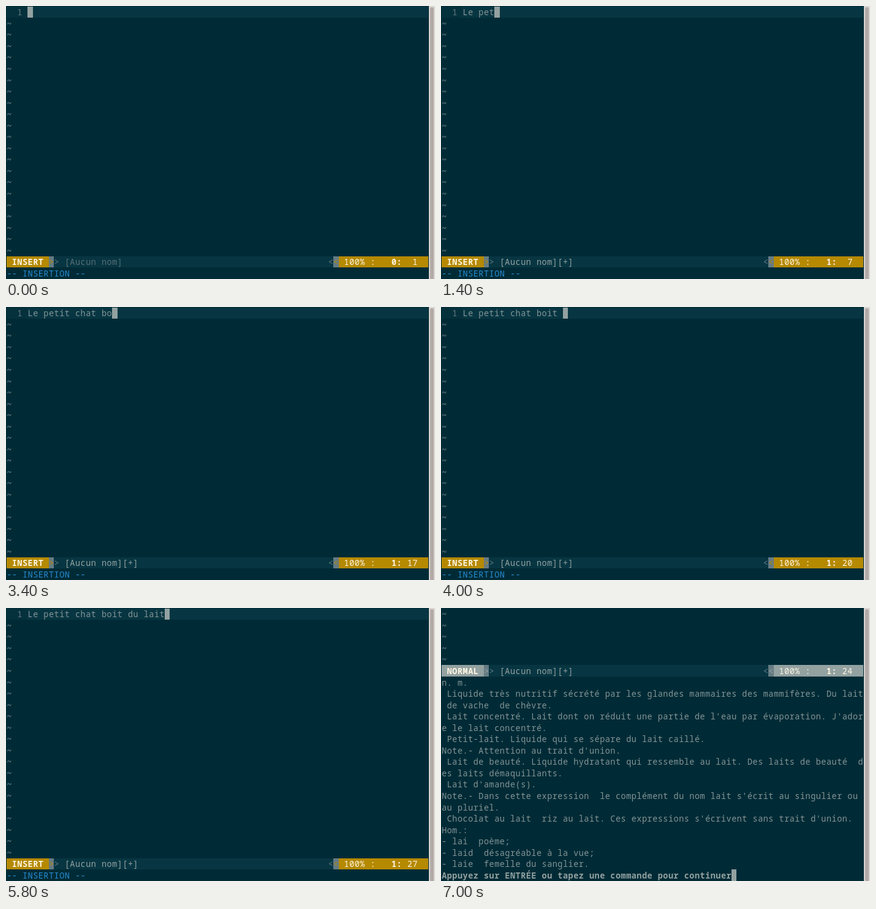
An HTML page with a canvas for the animation above (8000 ms loop, 700 by 446 pixels).

```html
<!DOCTYPE html>
<html lang="fr">
<head>
<meta charset="utf-8">
<title>Terminal</title>
<style>
  html, body { margin: 0; width: 100%; height: 100%; overflow: hidden; background: #002b36; }
  canvas { display: block; }
</style>
</head>
<body>
<canvas id="stage" width="700" height="446"></canvas>
<script>
const ctx = document.getElementById('stage').getContext('2d');
const LOOP = 8000, STEP = 200;
const CW = 8.6, RH = 18.55, X0 = 0.9, Y0 = 0.6, COLS = 80;
const FACE = '"Noto Sans Mono", "DejaVu Sans Mono", monospace';
const C = {
  bg: '#002b36', line: '#073642', gutter: '#04313c', dim: '#586e75', mid: '#657b83',
  text: '#839496', light: '#93a1a1', white: '#fdf6e3', gold: '#b58900', blue: '#268bd2'
};
const SENTENCE = 'Le petit chat boit du lait.';
const ENTRY = [
  'n. m.',
  ' Liquide très nutritif sécrété par les glandes mammaires des mammifères. Du lait',
  ' de vache  de chèvre.',
  " Lait concentré. Lait dont on réduit une partie de l'eau par évaporation. J'ador",
  'e le lait concentré.',
  ' Petit-lait. Liquide qui se sépare du lait caillé.',
  "Note.- Attention au trait d'union.",
  ' Lait de beauté. Liquide hydratant qui ressemble au lait. Des laits de beauté  d',
  'es laits démaquillants.',
  " Lait d'amande(s).",
  "Note.- Dans cette expression  le complément du nom lait s'écrit au singulier ou",
  'au pluriel.',
  " Chocolat au lait  riz au lait. Ces expressions s'écrivent sans trait d'union.",
  'Hom.:',
  '- lai  poème;',
  '- laid  désagréable à la vue;',
  '- laie  femelle du sanglier.'
];
const PROMPT = 'Appuyez sur ENTRÉE ou tapez une commande pour continuer';

const px = col => X0 + col * CW;
const py = row => Y0 + row * RH;

function cells(col, row, count, color) {
  const x = Math.round(px(col)), y = Math.round(py(row));
  ctx.fillStyle = color;
  ctx.fillRect(x, y, Math.round(px(col + count)) - x, Math.round(py(row + 1)) - y);
}

// Every character is centred in its terminal cell.
function write(str, col, row, color, bold) {
  ctx.font = (bold ? 'bold ' : '') + '13.5px ' + FACE;
  ctx.fillStyle = color;
  ctx.textAlign = 'center';
  [...str].forEach((ch, i) => {
    if (ch !== ' ') ctx.fillText(ch, px(col + i + 0.5), py(row) + 14.6);
  });
}

function tildes(from, to) {
  for (let r = from; r <= to; r++) write('~', 0, r, C.mid, true);
}

function scrollbar() {
  ctx.fillStyle = '#dad6d2';
  ctx.fillRect(690, 0, 10, 446);
  ctx.fillStyle = '#b2aaa6';
  ctx.beginPath();
  ctx.roundRect(692, 2, 6, 460, 3);
  ctx.fill();
}

function statusBar(row, s) {
  const main = s.insert ? C.gold : C.light;
  cells(0, row, COLS, C.line);
  cells(0, row, 8, main);
  cells(8, row, 1, C.mid);
  cells(62, row, 1, C.mid);
  cells(63, row, 17, main);
  write(s.insert ? 'INSERT' : 'NORMAL', 1, row, C.white, true);
  write('>', 8, row, main);
  write('>', 9, row, C.mid);
  write(s.typed ? '[Aucun nom][+]' : '[Aucun nom]', 11, row, s.typed ? C.light : C.dim);
  write('<', 61, row, C.mid);
  write('<', 62, row, main);
  write('100% :', 64, row, C.white);
  write(s.typed ? '1:' : '0:', 73, row, C.white, true);
  write(String(s.col).padStart(3), 75, row, C.white);
}

function editor(s) {
  cells(0, 0, 4, C.gutter);
  cells(4, 0, 76, C.line);
  write('1', s.insert ? 2 : 0, 0, C.mid);
  write(SENTENCE.slice(0, s.typed), 4, 0, C.text);
  if (!s.command) {
    cells(3 + s.col, 0, 1, C.light);
    if (!s.insert) write(SENTENCE[s.col - 1], 3 + s.col, 0, C.bg);
  }
  tildes(1, 21);
  statusBar(22, s);
  if (s.insert) write('-- INSERTION --', 0, 23, C.blue);
  else if (s.command) write(':', 0, 23, C.text);
}

function definition(s) {
  tildes(0, 4);
  statusBar(5, s);
  ENTRY.forEach((str, i) => write(str, 0, 6 + i, C.text));
  write(PROMPT, 0, 23, C.light, true);
  cells(PROMPT.length, 23, 1, C.light);
}

// One key per step, a pause before the full stop, then back to the last word.
function stateAt(t) {
  const n = Math.floor(t / STEP);
  const insert = n < 31;
  const typed = n >= 30 ? 27 : Math.min(26, Math.max(0, n - 1));
  const col = insert ? typed + 1 : n === 31 ? 27 : 24;
  return { insert, typed, col, command: n >= 34, result: n >= 35 };
}

function draw(t) {
  const s = stateAt(t);
  ctx.fillStyle = C.bg;
  ctx.fillRect(0, 0, 700, 446);
  if (s.result) definition(s);
  else editor(s);
  scrollbar();
}

const start = performance.now();
function tick() {
  draw((performance.now() - start) % LOOP);
  requestAnimationFrame(tick);
}
tick();
</script>
</body>
</html>
```
